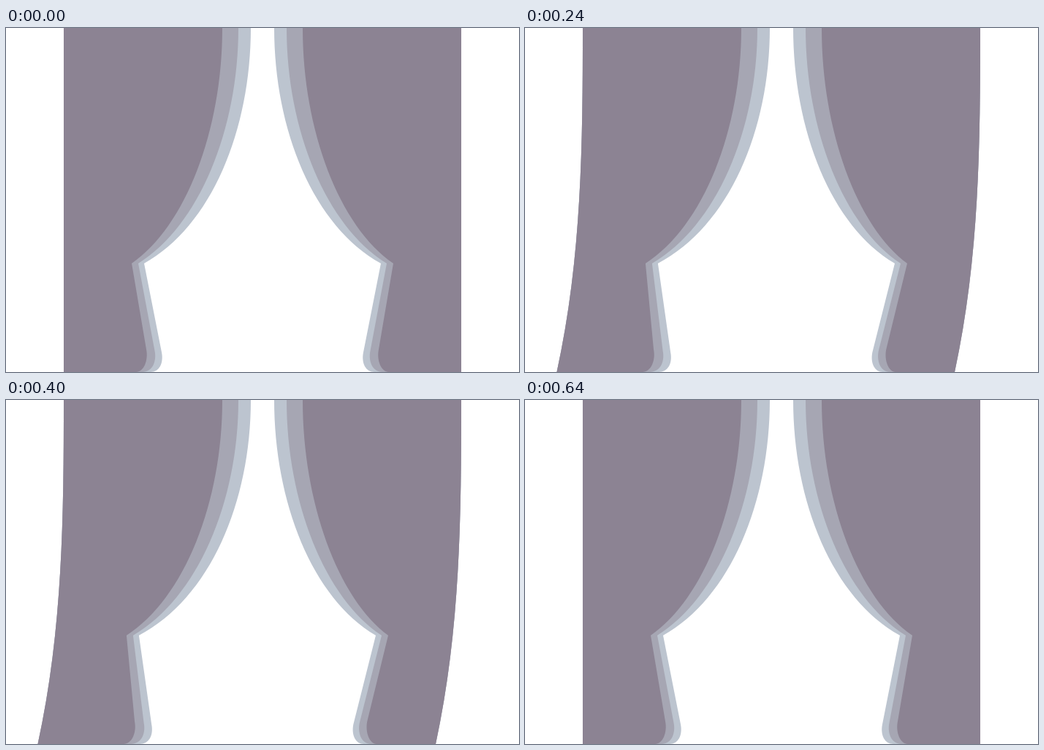
An HTML page with a canvas for the animation above (2640 ms loop, 702 px wide and 472 px high).

```html
<!DOCTYPE html>
<html lang="en">
<head>
<meta charset="utf-8">
<title>Swaying curtains</title>
<style>
  html, body { margin: 0; width: 100%; height: 100%; overflow: hidden; background: #fff; }
  canvas { display: block; }
</style>
</head>
<body>
<canvas id="stage" width="702" height="472"></canvas>
<script>
const W = 702, H = 472, KNEE_Y = 323, OUTER_X = 79;
const LOOP = 2640, STEP = 80, STEPS = 8;
const ctx = document.getElementById("stage").getContext("2d");

// Inner edge of each fabric layer, back to front; gain is its share of the sway.
const layers = [
  { color: "#bcc4cf", top: 335, belly: 281, knee: 189, leg: 213, legY: 445, foot: 198, gain: 0.39 },
  { color: "#a6a6b3", top: 318, belly: 263.5, knee: 181, leg: 203.5, legY: 443, foot: 187, gain: 0.42 },
  { color: "#8c8393", top: 296, belly: 246, knee: 172, leg: 192, legY: 441, foot: 178, gain: 0.45 }
];

// Sideways travel of the outer hem, from rest to full sway.
const leftSway = [0, 10, 23, 35.5, 45];
const rightSway = [0, 9.5, 21, 35, 44.5];

function drawLayer(l, sway) {
  const kneeX = l.knee + sway * 0.2;
  const d = sway * l.gain;
  ctx.fillStyle = l.color;
  ctx.beginPath();
  ctx.moveTo(OUTER_X, 0);
  ctx.lineTo(l.top, 0);
  ctx.bezierCurveTo(l.top, 140, l.belly + sway * 0.05, 272, kneeX, KNEE_Y);
  ctx.lineTo(l.leg + d, l.legY);
  ctx.bezierCurveTo(l.leg + 3 + d, l.legY + 15, l.leg - 3.5 + d, H, l.foot + d * 1.08, H);
  ctx.lineTo(OUTER_X + sway, H);
  ctx.bezierCurveTo(OUTER_X + sway * 0.03, H * 2 / 3, OUTER_X, H / 3, OUTER_X, 0);
  ctx.fill();
}

function drawCurtain(mirrored, sway) {
  ctx.save();
  if (mirrored) {
    ctx.translate(W, 0);
    ctx.scale(-1, 1);
  }
  for (const l of layers) drawLayer(l, sway);
  ctx.restore();
}

function draw(now) {
  const step = Math.min(Math.floor((now % LOOP) / STEP), STEPS);
  const pose = 4 - Math.abs(step - 4);
  ctx.fillStyle = "#fff";
  ctx.fillRect(0, 0, W, H);
  drawCurtain(false, -leftSway[pose]);
  drawCurtain(true, rightSway[pose]);
}

const start = performance.now();
function frame() {
  draw(performance.now() - start);
  requestAnimationFrame(frame);
}
frame();
</script>
</body>
</html>
```
